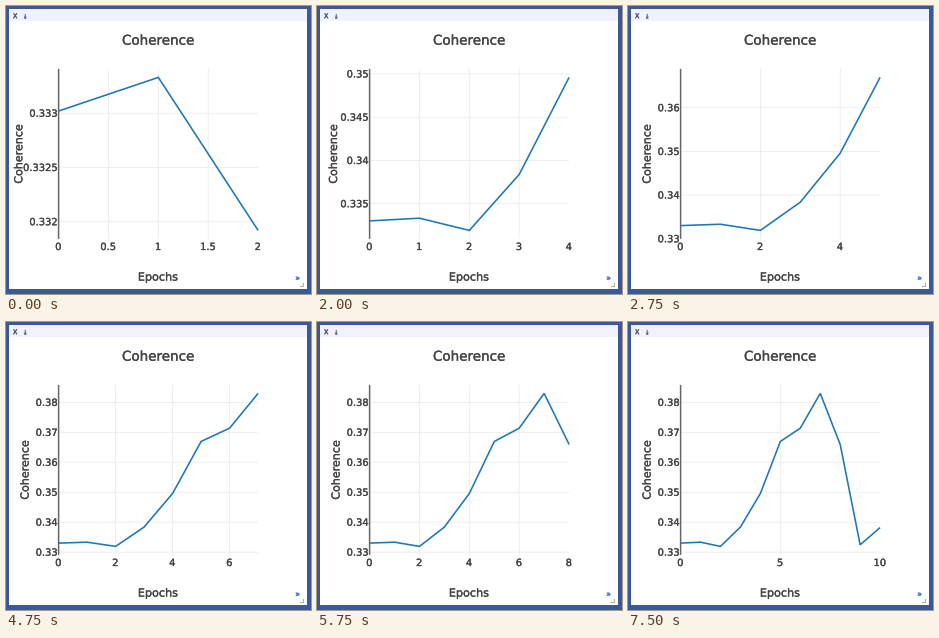
Animation, 305 px wide and 288 px high, one loop 8 s. Source, as a matplotlib script:

```python
import math

import matplotlib.pyplot as plt
from matplotlib.animation import FuncAnimation
from matplotlib.patches import Rectangle
from matplotlib.patheffects import withStroke

W, H, DPI = 305, 288, 100
PX = 72 / DPI  # points per pixel
STEP, LOOP = 250, 8000

COHERENCE = [0.33302, 0.33333, 0.33192, 0.33839, 0.34960, 0.36695,
             0.37140, 0.38300, 0.36595, 0.33245, 0.33820]
UPDATES = [1000, 2000, 2750, 3750, 4750, 5750, 6750, 7500]
FIRST, LAST = 2, 10

LEFT, TOP, WIDTH, HEIGHT = 52.6, 62.9, 199.5, 170
INK, AXIS, GRID, LINE = "#444444", "#666666", "#ebebeb", "#1f77b4"

plt.rcParams.update({"font.family": "DejaVu Sans", "text.hinting": "none",
                     "toolbar": "None"})
fig = plt.figure(figsize=(W / DPI, H / DPI), dpi=DPI)
ax = fig.add_axes([0, 0, 1, 1])
ax.set_xlim(0, W)
ax.set_ylim(H, 0)
ax.axis("off")


def box(x, y, w, h, color):
    ax.add_patch(Rectangle((x, y), w, h, fc=color, ec="none", lw=0))


def stroke(xs, ys, color, width, **kw):
    kw.setdefault("solid_capstyle", "butt")
    return ax.plot(xs, ys, color=color, lw=width * PX, snap=False, **kw)[0]


def label(x, y, s, size, color=INK, ha="center", **kw):
    # A hairline outline gives the text its slightly heavy weight.
    weight = [withStroke(linewidth=0.3 * PX, foreground=color)]
    return ax.text(x, y, s, fontsize=size * PX, color=color, ha=ha,
                   va="baseline", path_effects=weight, **kw)


def nice_step(rough):
    """Round up to 2, 5 or 10 times a power of ten."""
    base = 10 ** math.floor(math.log10(rough))
    return base * next((m for m in (2, 5) if rough / base < m - 1e-9), 10)


def ticks(lo, hi, count):
    step = nice_step((hi - lo) / count)
    first = math.ceil(lo / step - 1e-9)
    last = math.floor(hi / step + 1e-9)
    return [round(i * step, 8) for i in range(first, last + 1)]


def draw_window():
    box(0, 0, W, H, "#3b5998")
    box(3, 3, 298, 280, "#ffffff")
    box(3, 3, 298, 12, "#f0f2ff")
    label(9.2, 12.2, "X", 6.6, "#4a4a62")
    stroke([19.2, 19.2], [7.8, 12], "#4a4a62", 0.9)
    stroke([18, 19.2, 20.4], [10.6, 12, 10.6], "#4a4a62", 0.7)
    stroke([18, 20.6], [12.7, 12.7], "#4a4a62", 0.6)
    label(291.6, 274.6, "»", 8, "#3c6fc4")
    stroke([294, 297.5, 297.5], [280.5, 280.5, 277], "#b0b088", 1)
    label(152.2, 38.7, "Coherence", 13.5)
    label(152, 274.6, "Epochs", 11.2)


def draw_chart(n):
    data = COHERENCE[:n + 1]
    pad = (max(data) - min(data)) / 18
    lo, hi = min(data) - pad, max(data) + pad

    def to_x(v):
        return LEFT + WIDTH * v / n

    def to_y(v):
        return TOP + HEIGHT * (hi - v) / (hi - lo)

    right, bottom = LEFT + WIDTH, TOP + HEIGHT
    parts = []
    for v in ticks(0, n, 5):
        x = to_x(v)
        if LEFT + 1 < x < right - 1:
            parts.append(stroke([x, x], [TOP, bottom], GRID, 0.8))
        parts.append(label(x - 0.3, 244, f"{v:g}", 9.9))

    names = []
    for v in ticks(lo, hi, 6.4):
        y = to_y(v)
        if TOP + 1 < y < bottom - 1:
            parts.append(stroke([LEFT, right], [y, y], GRID, 0.8))
        names.append(f"{v:g}")
        parts.append(label(51.6, y + 3.5, names[-1], 9.9, ha="right"))

    # The axis title gives way to wide tick labels.
    title_x = {4: 22.6, 5: 20, 6: 16.3}[max(map(len, names))]
    parts.append(label(title_x, 147.9, "Coherence", 11.1, rotation=90,
                       rotation_mode="anchor"))
    parts.append(stroke([LEFT, LEFT], [TOP, bottom], AXIS, 1.5))
    parts.append(stroke([to_x(i) for i in range(n + 1)],
                        [to_y(v) for v in data], LINE, 1.6,
                        solid_joinstyle="miter"))
    return parts


draw_window()
charts = {n: draw_chart(n) for n in range(FIRST, LAST + 1)}


def update(i):
    now = FIRST + sum(i * STEP >= t for t in UPDATES)
    for n, parts in charts.items():
        for part in parts:
            part.set_visible(n == now)
    return []


anim = FuncAnimation(fig, update, frames=LOOP // STEP, interval=STEP,
                     repeat=True, repeat_delay=0, blit=False)
plt.show()
```
